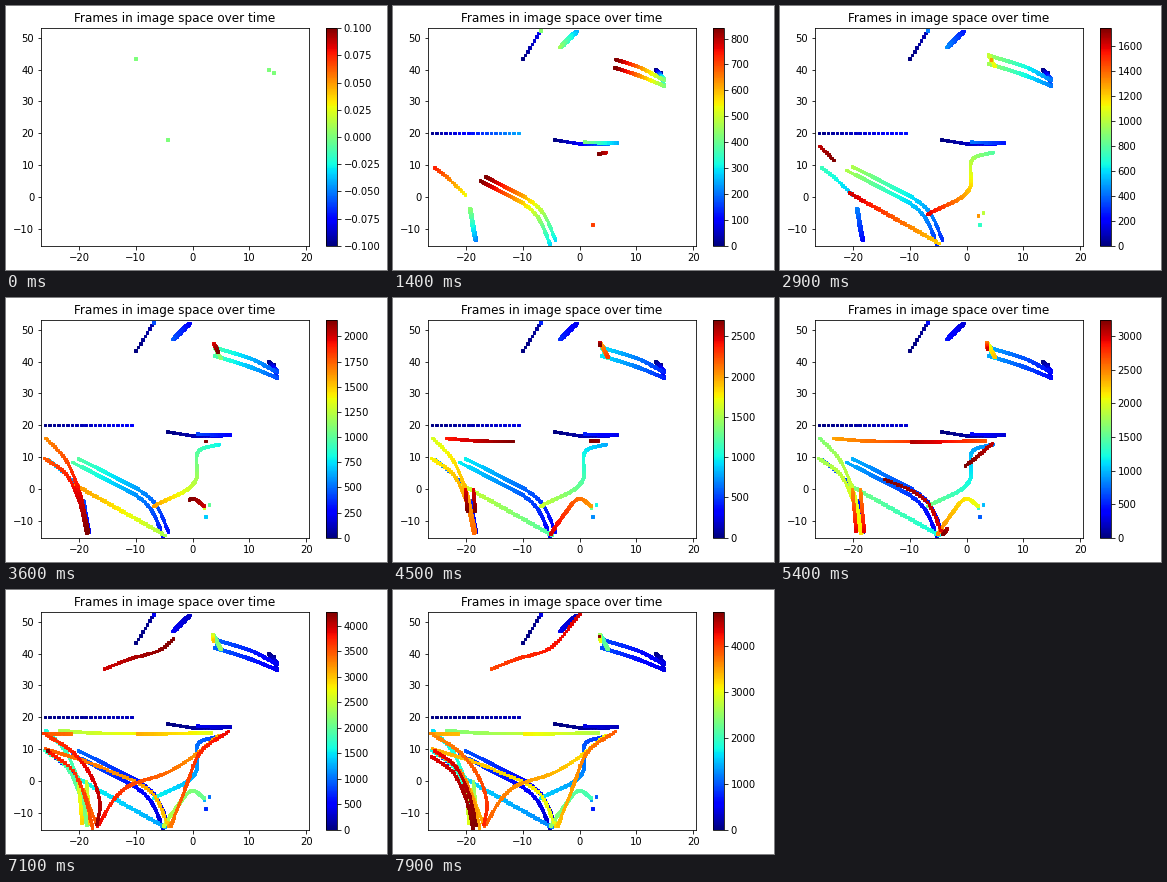
Write a matplotlib script that moves like this. It is 381 px wide and 264 px high and loops after 8 s.

```python
import numpy as np
import matplotlib.pyplot as plt
from matplotlib.animation import FuncAnimation

W, H, DPI = 381, 264, 72
FRAMES, STEP, DT = 80, 60, 12  # time units per frame, and between samples
X_LIM, Y_LIM = (-26.65, 20.5), (-15.4, 53)

plt.rcParams.update({"font.family": "DejaVu Sans", "font.size": 10})
fig = plt.figure(figsize=(W / DPI, H / DPI), dpi=DPI, facecolor="white")
ax = fig.add_axes([35.2 / W, 24.3 / H, 267.84 / W, 217.44 / H])
cax = fig.add_axes([319.8 / W, 24.3 / H, 10.87 / W, 217.44 / H])
ax.set(xlim=X_LIM, ylim=Y_LIM, title="Frames in image space over time")

samples = []


def drive(t0, t1, lane, dx=0, dy=0):
    """Follow a smooth curve through the lane's key points at constant speed."""
    p = np.array(lane, float) + (dx, dy)
    t = np.arange(np.ceil(t0 / DT) * DT, t1 + 1, DT)
    scale = 267.84 / np.ptp(X_LIM), 217.44 / np.ptp(Y_LIM)
    s = np.r_[0, np.cumsum(np.hypot(*(np.diff(p, axis=0) * scale).T))]
    m = np.gradient(p, s, axis=0)
    u = (t - t0) / (t1 - t0) * s[-1]
    i = np.clip(np.searchsorted(s, u) - 1, 0, len(s) - 2)
    h = (s[i + 1] - s[i])[:, None]
    k = (u - s[i])[:, None] / h
    xy = ((1 + 2 * k) * (1 - k) ** 2 * p[i] + k * (1 - k) ** 2 * h * m[i]
          + k * k * (3 - 2 * k) * p[i + 1] + k * k * (k - 1) * h * m[i + 1])
    samples.append(np.column_stack([t, xy]))


def stop(t, x, y):
    drive(t, t + DT, [(x, y), (x, y + 0.2)])


# Top edge
drive(0, 84, [(-10, 43.5), (-7.2, 51.5)])
stop(420, -6.9, 52.3)
for t1, dx in (460, 0), (400, 0.3):
    drive(250, t1, [(-0.7, 52.2), (-3.7, 47)], dx)
drive(3950, 4380, [(-16, 35), (-11, 38.5), (-5.8, 41.3), (0, 52.5)])

# Upper right: two cars wait, leave side by side, then park
for i in range(2):
    drive(0, 410, [(13.4 + 0.8 * i, 40 - i), (14.8, 37 - 2 * i)])
drive(420, 950, [(14.8, 36.8), (10.5, 40.8), (3.9, 44.5)])
drive(420, 950, [(14.8, 35), (11, 37.8), (3.8, 42)])
parked = [(3.7, 45.7), (4.9, 41.5)]
drive(1000, 1120, parked, 0, -0.5)
drive(1980, 2280, parked)
drive(2500, 3000, [(3.5, 46), (3.6, 44)])
stop(1296, 4.3, 43)
stop(4690, 3.4, 45.5)

# Horizontal road
drive(12, 240, [(-26, 20), (-10.8, 20)])
drive(0, 240, [(-4.4, 18), (0, 16.8), (6.6, 16.9)])
drive(250, 430, [(6.6, 17), (0.5, 17.3)])
stop(2145, 2.3, 15)
drive(2380, 2750, [(-23.7, 16), (-18, 15.2), (-10, 15)])
drive(2650, 3100, [(3.3, 15.2), (-9.8, 14.8)])
drive(3350, 3480, [(-21, 14.8), (-26.2, 15)])

# Right-hand turns
drive(770, 1600, [(4.8, 14.2), (1, 12), (0.5, 3), (-7, -5.5)])
stop(700, 2.3, -8.9)
stop(1000, 2.9, -5)
stop(1296, 2, -5.9)
drive(2010, 2500, [(2, -5.5), (0, -3), (-2.8, -8), (-5.2, -14.3)])
drive(3060, 3860, [(4.5, 14.4), (-0.3, 7.3), (-4, 3.2), (-12.5, -3), (-17, -14.5)])
drive(3330, 3860, [(-4, -14.5), (-1.5, -3), (1.5, 9.5), (6.5, 16)])

# Centre sweep, driven side by side and again later
sweep = [(-4.2, -14), (-6.5, -5), (-15.5, 5.3), (-20.4, 9.8)]
for i in range(2):
    drive(280, 980, sweep, -i, -1.2 * i)
drive(2950, 3480, [(-4.3, -14.2), (-7, -4.2), (-15, 3.5), (-26, 10.3)])
drive(3080, 3230, [(-3.4, -12.3), (-4.2, -14.3)])

# Diagonal
for i in range(2):
    drive(1200, 1620, [(-5, -14.5), (-20, 0.5)], -0.7 * i, 0.9 * i)

# Left-hand road
left = [(-26, 9.8), (-22.3, 5), (-20, -3), (-18.5, -13.8)]
side = [(-19.3, -3.2), (-18.3, -13.6)]
drive(540, 740, [(-20.2, 0.8), (-23.6, 6.5), (-25.8, 9.6)])
for i in range(2):
    drive(200 + 20 * i, 440, side[::-1], -0.2 * i)
    drive(2450, 2950, [(-20.2, 0), (-19.5, -13.5)], 1.4 * i)
    drive(4250 + 80 * i, 4740, left, 0.2 - 0.4 * i, -2 * i)
drive(1640, 2160, [(-26, 16.2), (-22.5, 9.5), (-20, -1), (-18.4, -13.6)])
drive(1750, 2160, left, -0.2)
drive(3300, 3500, [(-20, 0), (-16.8, -14.2)])
drive(3480, 3780, left[::-1], 0.8, -1)
drive(3600, 4150, [(-26.2, 15), (-20.5, 8), (-16.4, -8), (-17, -14.3)])

data = np.vstack(samples)
data = data[np.argsort(data[:, 0], kind="stable")]
times, points = data[:, 0], data[:, 1:]

dots = ax.scatter(*points.T, c=times, s=7, marker="s", cmap="jet")
fig.colorbar(dots, cax=cax)


def draw(frame):
    now = frame * STEP
    n = np.searchsorted(times, now, side="right")
    dots.set_offsets(points[:n])
    dots.set_array(times[:n])
    dots.set_clim(*((0, now) if now else (-0.1, 0.1)))
    return dots,


anim = FuncAnimation(fig, draw, frames=FRAMES, interval=100, repeat=True,
                     repeat_delay=0, blit=False)
plt.show()
```
